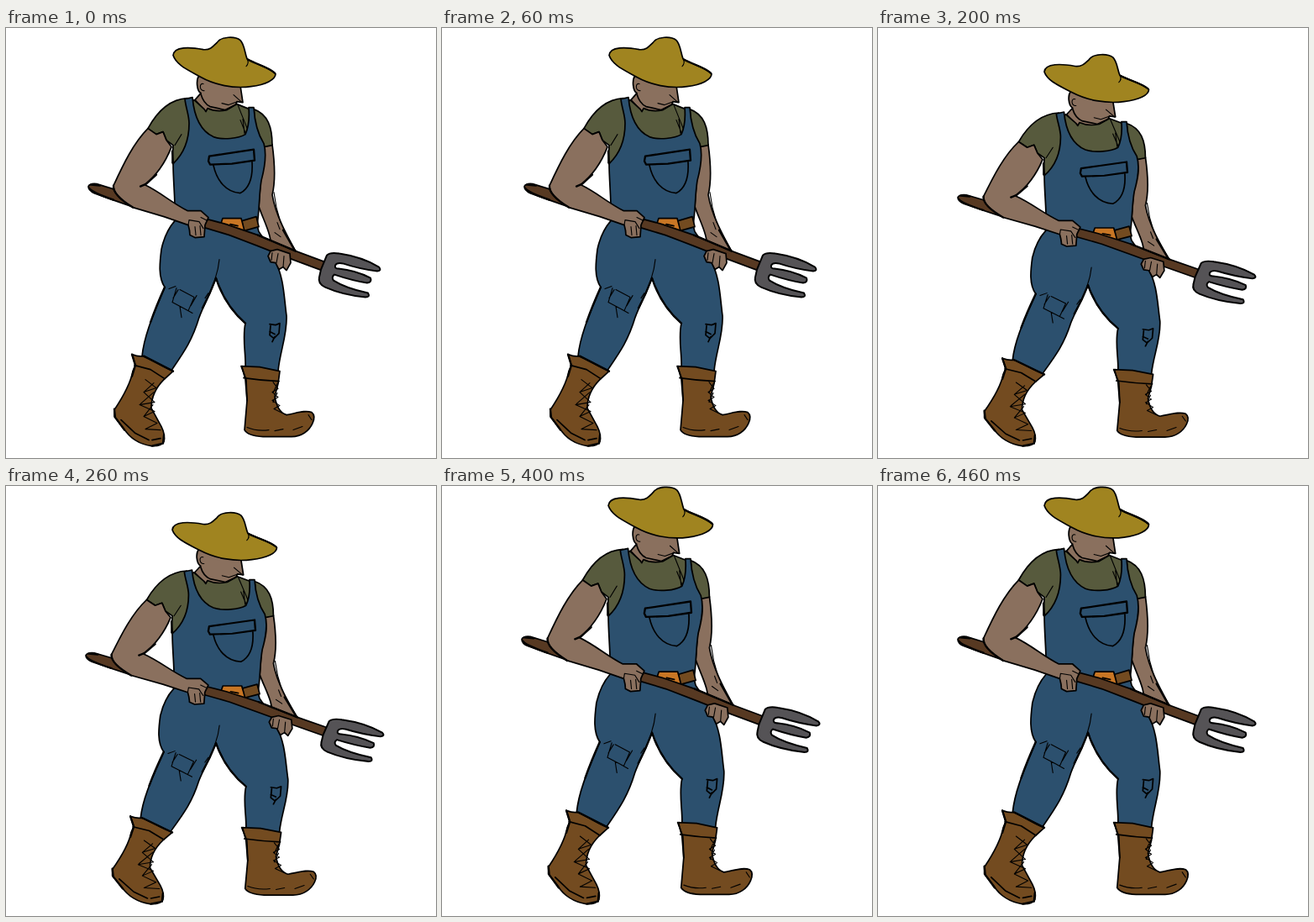
An HTML page that plays this animation: 512 by 512 pixels, repeating every 0.5 s.

```html
<!DOCTYPE html>
<html lang="en">
<head>
<meta charset="utf-8">
<title>Farmer</title>
<style>
  html, body { margin: 0; width: 100%; height: 100%; overflow: hidden; background: #fff; }
  svg { display: block; width: 100vw; height: 100vh; }
  path { stroke: #000; stroke-width: 1.7; stroke-linejoin: round; stroke-linecap: round; }
  .skin { fill: #8a705e; }
  .shirt { fill: #575a3d; }
  .denim { fill: #2c506e; }
  .leather { fill: #734b20; }
  .wood { fill: #573922; }
  .steel { fill: #555356; stroke-width: 2; }
  .straw { fill: #a08420; }
  .buckle { fill: #c87624; }
  .line { fill: none; }
  .thin { fill: none; stroke-width: 1.1; }
  .bold { fill: none; stroke-width: 2.3; }
</style>
</head>
<body>
<svg viewBox="0 0 512 512">
  <g id="farmer">
    <!-- handle end and far arm -->
    <path class="wood" d="M98 188Q100 184 108 185L134 193 150 199 150 212 127 204 105 196Q98 193 98 188Z"/>
    <path class="bold" d="M99 190Q102 195 128 204M101 186L112 187"/>
    <path class="skin" d="M306 141L317 138C320 160 321 182 317 198C321 222 334 246 347 269L330 272 315 266C318 248 308 232 301 212L304 170Z"/>
    <path class="thin" d="M319 195L322 213 327 231M320 243L327 248M323 231L326 239"/>
    <path class="bold" d="M330 240L346 268"/>

    <!-- neck and head -->
    <path class="skin" d="M230 56C226 61 227 74 232 77L225 85 237 98 262 99 273 92 275 87 282 88 279 68Z"/>
    <path class="thin" d="M235 66C230 64 230 75 236 74M257 89L265 91 276 87M271 79L281 88"/>
    <path class="line" d="M232 78Q235 89 243 93L261 97 273 91"/>

    <!-- shirt -->
    <path class="shirt" d="M216 83C196 84 181 97 169 119L179 126 187 123 191 133 199 139 198 160 212 159 224 132Z"/>
    <path class="shirt" d="M224 85L236 96 238 99 240 95Q250 100 263 97L275 90 290 96 290 134 230 134 219 90Z"/>
    <path class="shirt" d="M295 96C312 102 317 118 317 139L307 141 298 125Z"/>
    <path class="thin" d="M276 91L288 121M279 109L285 124M282 108L284 125M201 139L209 126"/>

    <!-- overalls -->
    <path class="denim" d="M213 84L222 82C224 105 232 122 247 129C258 133 277 131 285 126C289 117 290 106 289 94L295 94C296 110 300 126 307 137C311 151 308 166 304 181C301 200 302 215 299 234L301 242C309 253 315 264 320 276C331 296 331 320 334 342C335 365 326 385 324 408L285 405C286 388 281 369 285 351C269 337 257 319 250 297C244 314 236 328 230 344C222 371 212 385 197 407L162 390C165 361 180 331 189 308C181 296 183 279 185 263C188 249 194 237 201 229C202 207 199 183 199 161C213 148 218 132 218 113C218 103 214 94 213 84Z"/>
    <path class="bold" d="M198 146L199 161M250 297C257 319 269 337 285 351M189 308Q179 330 172 350M250 297Q243 316 234 333"/>
    <path class="thin" d="M254 275Q253 286 249 298"/>

    <!-- pocket and patches -->
    <path class="bold" d="M242 152L262 149 295 144 296 157 269 161 243 162 241 158Z"/>
    <path class="line" d="M247 163C251 181 262 195 279 196C290 190 294 176 293 159"/>
    <path class="thin" d="M194 310L202 307M203 309L198 326 213 334 222 339M205 311L199 321M207 311L224 320 217 336M227 318L220 330M207 331L209 344M241 315L237 321"/>
    <path class="line" d="M314 352L321 353 326 351 325 363 319 369 314 365 315 354M320 367L317 373M314 361L320 364"/>

    <!-- boots -->
    <path class="leather" d="M150 388Q158 391 163 390C175 395 188 404 199 408L188 418C178 428 173 440 173 452L185 474Q190 484 188 492Q184 498 173 497C159 495 147 487 140 476L129 462 129 454C139 439 148 424 151 408L154 401Z"/>
    <path class="bold" d="M150 388L154 401 150 414M129 453L130 463 141 478M164 390L199 408M188 484L187 494 174 497"/>
    <path class="line" d="M153 401L172 406 189 417M137 466L154 482 170 490M174 490L184 488"/>
    <path class="thin" d="M166 418L179 428 164 433 177 445 159 448 177 456 164 462 180 470 166 477 184 478M176 422L164 433M176 433L160 447M175 448L164 462"/>
    <path class="leather" d="M280 402L302 403 326 408 324 423 320 438C322 450 327 458 334 460C346 458 356 454 364 457Q369 461 365 470C361 479 352 486 340 486L306 486Q288 485 284 478L287 443 286 418Z"/>
    <path class="line" d="M283 416Q303 419 325 420M281 403L285 418 287 443"/>
    <path class="thin" d="M287 475Q299 480 313 478M320 479L330 477M342 478L353 474M318 421L324 429 317 433 324 439 317 443 326 449 319 453 329 458M323 423L318 434M323 434L318 445M360 460L364 466"/>

    <!-- belt and handle -->
    <path class="leather" d="M281 229L298 224 301 236 283 241Z"/>
    <path class="buckle" d="M258 226L280 226 284 241 273 240 256 232Z"/>
    <path class="line" d="M267 233L276 235"/>
    <path class="wood" d="M232 225L262 233 300 246 345 265 380 278 376 288 333 272 300 259 266 246 236 237Z"/>
    <path class="bold" d="M300 246L345 265"/>

    <!-- near arm and hands -->
    <path class="skin" d="M169 119C152 136 140 161 128 187C127 196 138 205 151 213L188 224 217 234Q219 241 219 246L225 249 236 248 237 234 241 225 232 217 216 217C198 208 184 195 165 186C179 175 190 159 197 141L191 133 187 123 179 126Z"/>
    <path class="bold" d="M128 187C127 196 138 205 151 213M160 188L167 185 179 174"/>
    <path class="thin" d="M217 234L218 228 230 230 235 238M225 236L226 246M231 235L232 246M232 225L240 229"/>
    <path class="skin" d="M315 265L323 263 338 268 339 279 334 288 330 284 325 287 321 279 315 278 312 271Z"/>
    <path class="thin" d="M317 267L316 276M324 268L322 279M331 271L330 284"/>

    <!-- fork -->
    <path class="steel" d="M375 287L382 270Q386 266 397 268Q424 272 444 284Q448 288 442 289Q420 286 402 280Q394 278 392 282Q391 286 396 286Q416 288 434 297Q436 302 430 303Q412 300 391 293Q387 296 390 300Q404 309 431 315Q434 320 428 320Q400 317 380 308Q371 304 373 296Z"/>

    <!-- hat -->
    <path class="straw" d="M199 32C200 21 219 22 235 25C243 26 247 21 251 17C256 9 273 9 279 14C284 19 284 28 287 36C298 43 313 46 321 54C321 61 309 67 292 69C271 72 248 67 232 58C218 50 203 44 199 32Z"/>
    <path class="bold" d="M288 37C299 43 313 46 320 53"/>
    <path class="thin" d="M287 36Q290 41 286 45"/>
  </g>
</svg>
<script>
  const LOOP = 500, STEP = 100, FLOOR = 498, CENTER = 247;
  const heights = [1, 0.981, 0.958, 0.981, 1.02];
  const farmer = document.getElementById("farmer");

  // The body squashes and stretches in hard steps, with the soles as the fixed line.
  function draw() {
    const step = Math.floor(performance.now() % LOOP / STEP);
    const sx = step ? 1.02 : 1, sy = heights[step];
    farmer.setAttribute("transform",
      `translate(${CENTER} ${FLOOR + 0.6}) scale(${sx} ${sy}) translate(${-CENTER} ${-FLOOR})`);
    requestAnimationFrame(draw);
  }
  draw();
</script>
</body>
</html>
```
